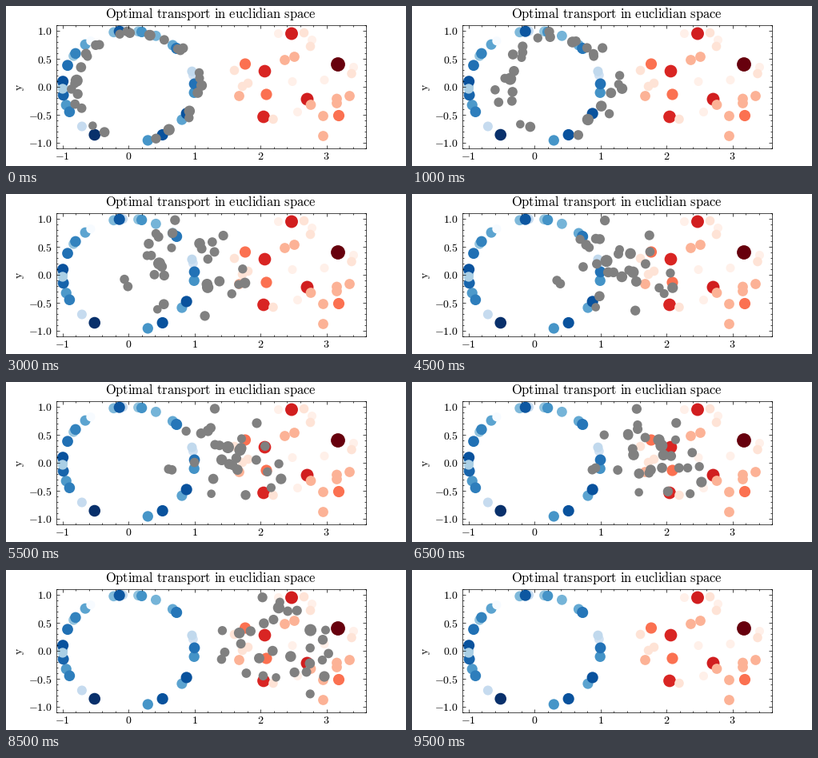
A matplotlib script for the animation above (10 s loop, 500 by 200 pixels).

```python
import numpy as np
import matplotlib.pyplot as plt
from matplotlib.animation import FuncAnimation
from matplotlib.ticker import AutoMinorLocator, FuncFormatter, MultipleLocator

W, H, DPI = 500, 200, 100
STEPS, INTERVAL = 20, 500
X_RANGE, Y_RANGE = (-1.1, 3.6), (-1.1, 1.1)
LEFT, TOP, WIDTH, HEIGHT = 62.5, 24, 387.5, 154

plt.rcParams.update({"mathtext.fontset": "cm", "axes.linewidth": 0.5, "font.size": 10})

# Red weight, first and last blue weight, then the trips:
# departure angle on the unit circle, arrival pixel.
GROUPS = [
    (0.70, 0.25, 0.25, [(95, 323, 81)]),
    (0.11, 0.38, 0.80, [(179.5, 372, 33), (103, 285, 80), (48, 333.5, 141), (199, 295, 100),
                        (43, 302, 96), (43.5, 380, 50), (188.5, 431.5, 84)]),
    (0.03, 0.25, 1.00, [(225, 364, 132), (146.5, 434, 76), (-36, 397.5, 92),
                        (206.5, 382, 42), (98, 340, 34), (239, 357.5, 94)]),
    (1.00, 0.87, 0.87, [(174.5, 414.5, 72.5)]),
    (0.28, 0.20, 0.75, [(12, 396, 162), (16, 413, 115.5), (182, 291, 112),
                        (81.5, 429, 112), (65.5, 396, 137), (131, 360, 63),
                        (-73, 380.5, 123), (143.5, 348, 67), (157.5, 413, 121)]),
    (0.48, 0.62, 0.87, [(-6, 325, 110), (3, 415.5, 136.5), (-28.5, 298.5, 72)]),
    (0.70, 0.00, 0.00, [(125, 321.5, 138)]),
    (0.73, 0.62, 0.87, [(78.5, 376, 116), (-59, 356.5, 34)]),
]


def on_circle(degrees):
    angle = np.radians(degrees)
    return np.column_stack([np.cos(angle), np.sin(angle)])


def from_pixels(x, y):
    """Data coordinates of pixel centres."""
    return np.column_stack([
        X_RANGE[0] + (x + 0.5 - LEFT) / WIDTH * np.ptp(X_RANGE),
        Y_RANGE[1] - (y + 0.5 - TOP) / HEIGHT * np.ptp(Y_RANGE),
    ])


def dots(points, radii, color, zorder):
    areas = (2 * radii * 72 / DPI) ** 2
    return ax.scatter(*points.T, s=areas, color=color, linewidths=0, zorder=zorder)


def roman(text):
    return r"$\mathrm{" + text.replace(" ", r"\ ") + "}$"


fig = plt.figure(figsize=(W / DPI, H / DPI), dpi=DPI, facecolor="white")
ax = fig.add_axes([LEFT / W, 1 - (TOP + HEIGHT) / H, WIDTH / W, HEIGHT / H])
ax.set(xlim=X_RANGE, ylim=Y_RANGE)

for axis, step, digits in ((ax.xaxis, 1, 0), (ax.yaxis, 0.5, 1)):
    axis.set_major_locator(MultipleLocator(step))
    axis.set_minor_locator(AutoMinorLocator(5))
    axis.set_major_formatter(FuncFormatter(lambda v, _, d=digits: f"${v:.{d}f}$"))
ax.tick_params(which="both", direction="in", top=True, right=True, width=0.5)
ax.tick_params(which="major", length=3)
ax.tick_params(which="minor", length=1.5)
ax.tick_params(axis="x", pad=1.8)
ax.tick_params(axis="y", pad=3.5)

fig.text(0.511, 1 - 15.3 / H, roman("Optimal transport in euclidian space"),
         fontsize=11.88, ha="center", va="baseline")
fig.text(18 / W, 1 - 101 / H, roman("y"), rotation=90, ha="center", va="center")

angles, *arrivals = np.concatenate([trips for *_, trips in GROUPS]).T
start, end = on_circle(angles), from_pixels(*arrivals)
red = np.concatenate([np.full(len(trips), r) for r, _, _, trips in GROUPS])
blue = np.concatenate([np.linspace(a, b, len(trips)) for _, a, b, trips in GROUPS])

dots(start, 5.6 + 1.7 * blue, plt.cm.Blues(blue), 1)
dots(end[::-1], 5.4 + 3.5 * red[::-1], plt.cm.Reds(red[::-1]), 1.1)
movers = dots(start, 4.9 + 1.4 * (blue + red), "#808080", 1.2)


def update(frame):
    t = (frame + 1) / STEPS
    movers.set_offsets(start + t * (end - start))
    movers.set_visible(t < 1)  # only the two clouds remain on arrival
    return (movers,)


anim = FuncAnimation(fig, update, frames=STEPS, interval=INTERVAL,
                     repeat=True, repeat_delay=0)
plt.show()
```
